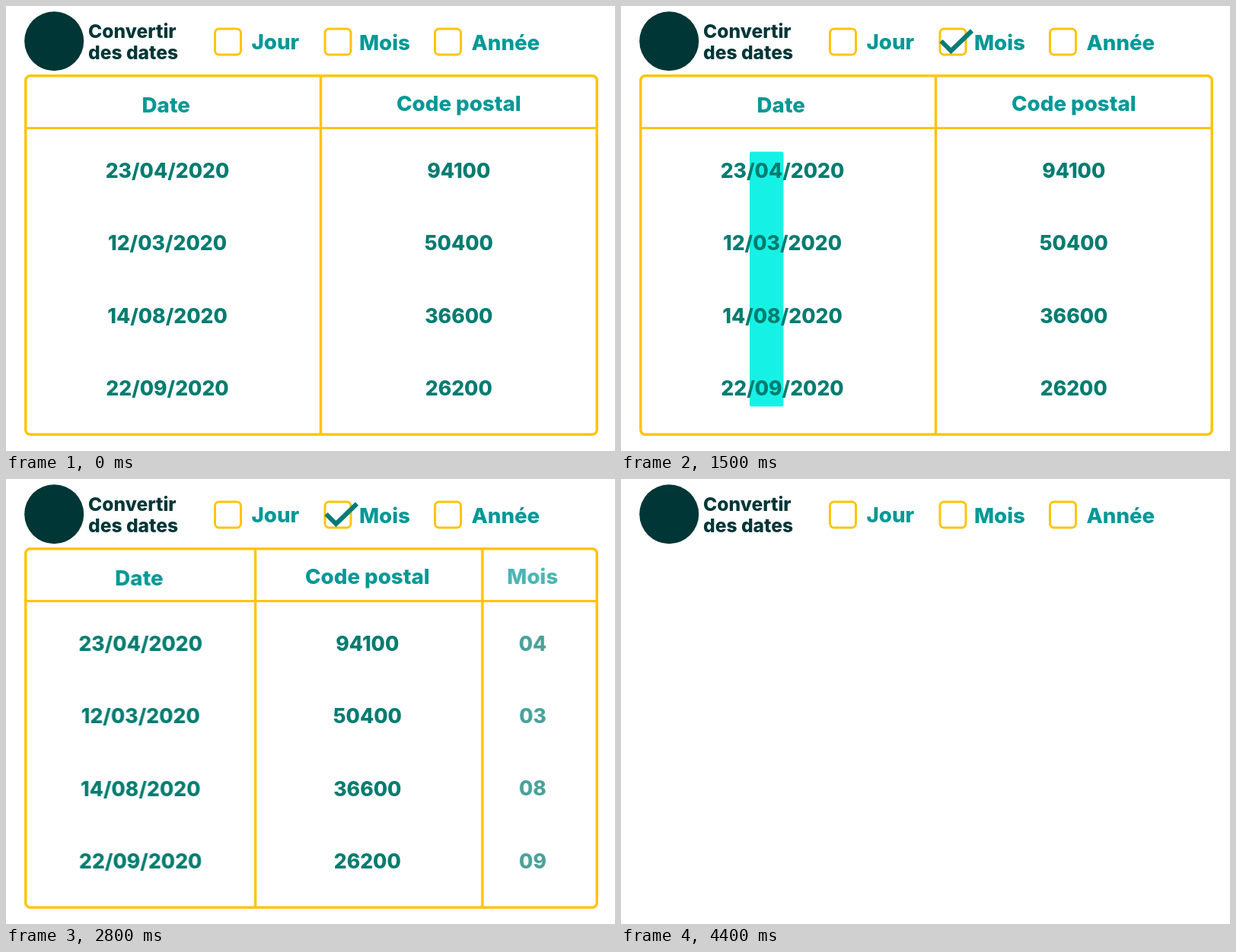
These frames come from a looping animation (800x585 px, 4500 ms). An HTML page:

```html
<!DOCTYPE html>
<html lang="fr">
<head>
<meta charset="utf-8">
<title>Convertir des dates</title>
<style>
  html, body { margin: 0; width: 100%; height: 100%; overflow: hidden; background: #fff; }
  svg { display: block; width: 800px; height: 585px; }
  text { font: 800 27.7px Inter, "Open Sans", sans-serif; }
  .title { font-size: 24.6px; fill: #003636; }
  .head { fill: #009896; }
  .data { font-size: 26.5px; fill: #007c70; }
  .mid { text-anchor: middle; }
  .line { fill: none; stroke: #ffc409; stroke-width: 3.5; }
  .thin { stroke-width: 3; }
</style>
</head>
<body>
<svg viewBox="0 0 800 585">
  <circle cx="63.2" cy="46.2" r="39" fill="#003636"/>
  <text class="title" x="108" y="41.500">Convertir</text>
  <text class="title" x="108" y="70">des dates</text>
  <g id="options"></g>
  <path id="check" d="M420.5 46 L433.5 59 L461 32.500" fill="none" stroke="#007c74" stroke-width="6"/>
  <g id="grid">
    <rect class="line" x="25.800" y="91.800" width="750.400" height="471.400" rx="6"/>
    <path class="line thin" d="M26 160.500H776"/>
    <path class="line" id="split" d="M413.500 91V564"/>
    <path class="line" id="newSplit" d="M776 90V565"/>
  </g>
  <rect id="marker" x="168" y="191.500" width="44.500" height="335" rx="2" fill="#00f0e4"/>
  <g id="cells">
    <g id="dates"></g>
    <g id="codes"></g>
    <g id="months"></g>
  </g>
</svg>
<script>
const LOOP = 4500;
const NS = "http://www.w3.org/2000/svg";
const $ = id => document.getElementById(id);

function add(parent, tag, attrs, content = "") {
  const el = document.createElementNS(NS, tag);
  for (const key in attrs) el.setAttribute(key, attrs[key]);
  el.textContent = content;
  parent.append(el);
}

function addColumn(group, headX, x, headY, shift, head, values) {
  add(group, "text", { class: "head mid", x: headX, y: headY }, head);
  values.forEach((value, i) =>
    add(group, "text", { class: "data mid", x, y: 226 + shift + i * 95.4 }, value));
}

[["Jour", 274.5, 322.5, 57], ["Mois", 419, 464, 58], ["Année", 563.5, 611.5, 58]]
  .forEach(([label, boxX, textX, y]) => {
    add($("options"), "rect", { class: "line thin", x: boxX, y: 30, width: 34, height: 34, rx: 5.5 });
    add($("options"), "text", { class: "head", x: textX, y }, label);
  });

addColumn($("dates"), 210.2, 212, 140, 0, "Date", ["23/04/2020", "12/03/2020", "14/08/2020", "22/09/2020"]);
addColumn($("codes"), 594.8, 594.8, 138, 0, "Code postal", ["94100", "50400", "36600", "26200"]);
addColumn($("months"), 672.8, 673, 138, -0.5, "Mois", ["04", "03", "08", "09"]);

// Rows are [time in ms, style, steps to the next row]; one step means a hold.
function play(el, rows) {
  const frames = rows.map(([time, style, steps = 1]) =>
    ({ offset: time / LOOP, easing: `steps(${steps}, end)`, ...style }));
  frames.push({ ...frames[frames.length - 1], offset: 1 });
  el.animate(frames, { duration: LOOP, iterations: Infinity });
}

const alpha = opacity => ({ opacity });
const move = x => ({ transform: `translateX(${x}px)` });
const slide = (el, from, to) =>
  play(el, [[0, move(from)], [2300, move(from), 7], [3000, move(to)]]);

slide($("dates"), 0, -49.5);
slide($("codes"), 0, -168);
slide($("months"), 66, 0);
slide($("split"), 0, -120.3);
slide($("newSplit"), 0, -210.3);

play($("months"), [[0, alpha(0)], [2300, alpha(0), 7], [3000, alpha(1)]]);
play($("newSplit"), [[0, alpha(0)], [2300, alpha(1)]]);
play($("check"), [[0, alpha(0)], [400, alpha(0), 4], [800, alpha(1)], [3900, alpha(1), 5], [4400, alpha(0)]]);
play($("grid"), [[0, alpha(1)], [3900, alpha(1), 5], [4400, alpha(0)]]);
play($("cells"), [[0, alpha(1)], [4100, alpha(0.6), 3], [4400, alpha(0)]]);

const mark = (opacity, x) => ({ ...alpha(opacity), ...move(x) });
play($("marker"), [
  [0, mark(0, 6)], [1000, mark(0.25, 6)], [1100, mark(0.6, 4)], [1200, mark(0.91, 1)], [1300, mark(1, 0)],
  [1500, mark(0.91, 1)], [1600, mark(0.6, 4)], [1700, mark(0.25, 6)], [1800, mark(0, 6)]
]);

const fades = { head: ["#009896", "#04a5a4"], data: ["#007c70", "#00958a"] };
for (const name in fades) {
  const [fill, pale] = fades[name];
  $("cells").querySelectorAll("." + name)
    .forEach(el => play(el, [[0, { fill }], [4000, { fill: pale }]]));
}
</script>
</body>
</html>
```
